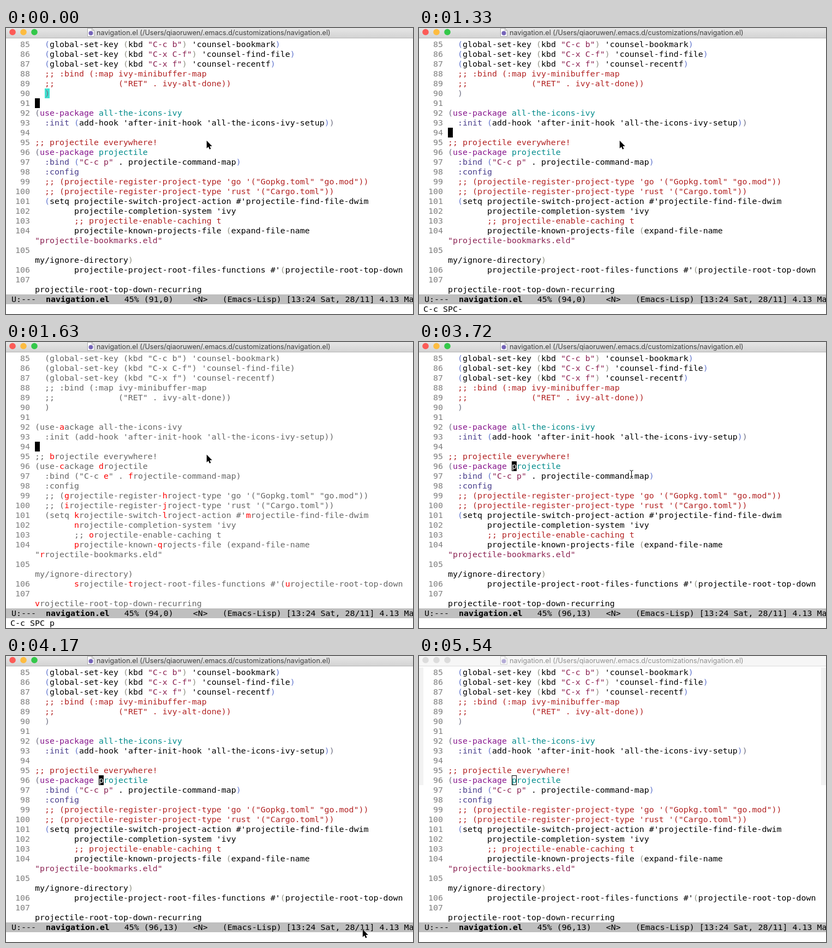
An HTML page for the animation above (5640 ms loop, 746 by 525 pixels).

```html
<!DOCTYPE html>
<html lang="en">
<head>
<meta charset="utf-8">
<title>Jump to word</title>
<style>
  html, body { margin: 0; width: 100%; height: 100%; overflow: hidden; background: #fff; }
  svg { display: block; width: 746px; height: 525px; }
  text { white-space: pre; font: 14.95px "DejaVu Sans Mono", "Liberation Mono", monospace; fill: #000; }
  .title { font: 12.65px Inter, "Open Sans", sans-serif; }
  .bold { font-weight: bold; }
  .num { fill: #7f7f7f; }
  .comment { fill: #b22222; }
  .string { fill: #8b2252; }
  .keyword { fill: #86158c; }
  .name { fill: #008b8b; }
  .builtin { fill: #483d8b; }
  .d1 { fill: #707183; }
  .d2 { fill: #6478cf; }
  .d3 { fill: #909183; }
  .dim { fill: #666; }
  .label { fill: #f00; }
</style>
</head>
<body>
<svg id="stage" viewBox="0 0 746 525">
  <defs>
    <linearGradient id="bar" x1="0" y1="0" x2="0" y2="1">
      <stop offset="0" stop-color="#e6e6e6"/>
      <stop offset="1" stop-color="#d2d2d2"/>
    </linearGradient>
  </defs>
  <rect width="746" height="525" fill="#fff"/>
</svg>
<script>
const NS = 'http://www.w3.org/2000/svg';
const stage = document.getElementById('stage');
const LOOP = 5640, CELL = 9, ROW = 18, LEFT = 53, TOP = 21, BASE = 14;

// Rows that start with "|" continue the line above and carry no number.
const rows = `  (global-set-key (kbd "C-c b") 'counsel-bookmark)
  (global-set-key (kbd "C-x C-f") 'counsel-find-file)
  (global-set-key (kbd "C-x f") 'counsel-recentf)
  ;; :bind (:map ivy-minibuffer-map
  ;;             ("RET" . ivy-alt-done))
  )

(use-package all-the-icons-ivy
  :init (add-hook 'after-init-hook 'all-the-icons-ivy-setup))

;; projectile everywhere!
(use-package projectile
  :bind ("C-c p" . projectile-command-map)
  :config
  ;; (projectile-register-project-type 'go '("Gopkg.toml" "go.mod"))
  ;; (projectile-register-project-type 'rust '("Cargo.toml"))
  (setq projectile-switch-project-action #'projectile-find-file-dwim
        projectile-completion-system 'ivy
        ;; projectile-enable-caching t
        projectile-known-projects-file (expand-file-name
|"projectile-bookmarks.eld"

|my/ignore-directory)
        projectile-project-root-files-functions #'(projectile-root-top-down

|projectile-root-top-down-recurring`.split('\n');
const lines = rows.map(r => r.replace(/^\|/, ''));

function el(tag, attrs, parent = stage, content = '') {
  const node = document.createElementNS(NS, tag);
  for (const k in attrs) node.setAttribute(k, attrs[k]);
  node.textContent = content;
  parent.appendChild(node);
  return node;
}
const write = (x, y, str, cls = '', parent = stage) => el('text', { x, y, class: cls }, parent, str);
const span = (parent, str, cls = '') => el('tspan', { class: cls }, parent, str);
const show = (node, on) => node.setAttribute('visibility', on ? 'visible' : 'hidden');
const rowTop = i => TOP + i * ROW;

// Title bar
const fringes = el('g', { fill: '#f2f2f2' });
for (const [x, width] of [[0, 8], [737, 9]]) el('rect', { x, y: 21, width, height: 216 }, fringes);
const bar = el('rect', { width: 746, height: 19 });
const barEdge = el('rect', { y: 18, width: 746, height: 1 });
const lightColors = ['#fc5b57', '#fdbc40', '#34c84a'];
const lights = lightColors.map((c, i) => el('circle', { cx: 12 + 20 * i, cy: 7.5, r: 5.8 }));
const icon = el('g', {});
el('path', { d: 'M149.5 .5h8l4 4v11h-12z', fill: '#fff', stroke: '#a9a9a9' }, icon);
el('path', { d: 'M157.5 .5v4h4', fill: 'none', stroke: '#a9a9a9' }, icon);
el('circle', { cx: 155.5, cy: 9.5, r: 4, fill: '#7564b8' }, icon);
const title = write(166, 13, 'navigation.el (/Users/qiaoruwen/.emacs.d/customizations/navigation.el)', 'title');

// Buffer
const paren = el('rect', { x: LEFT + 2 * CELL, y: rowTop(5), width: CELL, height: ROW, fill: '#40e0d0' });
const code = el('g', {}), faded = el('g', {});
let number = 85, depth = 1, label = 97;

function highlight(node, str) {
  for (const tok of str.match(/;;.*|"[^"]*"|use-package [\w-]+|:[a-z]+|[()]|[^;"():]+|./g) || []) {
    if (tok[0] === ';') span(node, tok, 'comment');
    else if (tok[0] === '"') span(node, tok, 'string');
    else if (tok[0] === ':') span(node, tok, 'builtin');
    else if (tok === '(') span(node, tok, 'd' + ++depth);
    else if (tok === ')') span(node, tok, 'd' + depth--);
    else if (tok.startsWith('use-package')) {
      span(node, 'use-package', 'keyword');
      span(node, tok.slice(11), 'name');
    } else span(node, tok);
  }
}

function fade(node, str) {
  for (const part of str.split(/(\bp)/)) {
    if (part === 'p') span(node, String.fromCharCode(label++), 'label');
    else span(node, part, 'dim');
  }
}

rows.forEach((row, i) => {
  const y = rowTop(i) + BASE;
  if (row[0] !== '|') write(17, y, String(number++).padStart(3), 'num');
  highlight(write(LEFT, y, '', '', code), lines[i]);
  fade(write(LEFT, y, '', '', faded), lines[i]);
});

const block = el('rect', { width: CELL, height: ROW });
const under = write(0, 0, '');
under.style.fill = '#fff';
const hollow = el('rect', { width: CELL - 1, height: ROW - 1, fill: 'none', stroke: '#000' });

// Mode line and echo area
el('rect', { y: 489, width: 746, height: 18, fill: '#bfbfbf' });
const mode = write(1, 503, ' U:---  ');
span(mode, 'navigation.el', 'bold');
const place = span(mode, '');
const echo = write(8, 521, '');

// Mouse pointers
const arrow = el('path', {
  d: 'M0 0V14.2L3.2 11.2L5.3 16L7.7 15L5.6 10.3H10Z',
  fill: '#000', stroke: '#fff', 'stroke-width': 1, 'paint-order': 'stroke'
});
const beam = el('path', {
  d: 'M386.5 235.5Q389.5 235.5 389.5 238V248Q389.5 250.5 386.5 250.5M392.5 235.5Q389.5 235.5 389.5 238M389.5 248Q389.5 250.5 392.5 250.5M387.5 246.5H391.5',
  fill: 'none', stroke: '#000'
});

// Each step is [start, value...]
const points = [[0, 91, 0], [150, 92, 2], [450, 93, 2], [590, 94, 0], [2530, 96, 13]];
const echoes = [[0, ''], [1190, 'C-c-'], [1330, 'C-c SPC-'], [1630, 'C-c SPC p'], [2530, '']];
const pointers = [[0, 366, 206], [3720, 0, 0], [3870, 498, 339], [4020, 598, 456],
  [4170, 652, 501], [4470, 653, 508], [4620, 0, 0]];
const stepAt = (steps, t) => steps.filter(s => s[0] <= t).pop();

function draw(t) {
  const focus = t < 5540, jumping = t >= 1630 && t < 2530;

  show(fringes, !focus);
  bar.setAttribute('fill', focus ? 'url(#bar)' : '#f6f6f6');
  barEdge.setAttribute('fill', focus ? '#b4b4b4' : '#dadada');
  lights.forEach((c, i) => c.setAttribute('fill', focus ? lightColors[i] : '#dcdcdc'));
  icon.setAttribute('opacity', focus ? 1 : 0.5);
  title.style.fill = focus ? '#404040' : '#8f8f8f';

  show(paren, t < 150);
  show(code, !jumping);
  show(faded, jumping);

  const [, line, col] = stepAt(points, t);
  const i = line - 85, x = LEFT + col * CELL, y = rowTop(i);
  block.setAttribute('x', x);
  block.setAttribute('y', y);
  hollow.setAttribute('x', x + 0.5);
  hollow.setAttribute('y', y + 0.5);
  under.setAttribute('x', x);
  under.setAttribute('y', y + BASE);
  under.textContent = lines[i][col] || '';
  show(block, focus);
  show(under, focus);
  show(hollow, !focus);

  place.textContent = '   45% ' + `(${line},${col})`.padEnd(10) +
    '<N>   (Emacs-Lisp) [13:24 Sat, 28/11] 4.13 Ma';
  echo.textContent = stepAt(echoes, t)[1];

  const [, px, py] = stepAt(pointers, t);
  arrow.setAttribute('transform', `translate(${px + 1.8} ${py + 0.8})`);
  show(arrow, px > 0);
  show(beam, t >= 3720 && t < 3870);
}

const start = performance.now();
function tick() {
  draw((performance.now() - start) % LOOP);
  requestAnimationFrame(tick);
}
tick();
</script>
</body>
</html>
```
